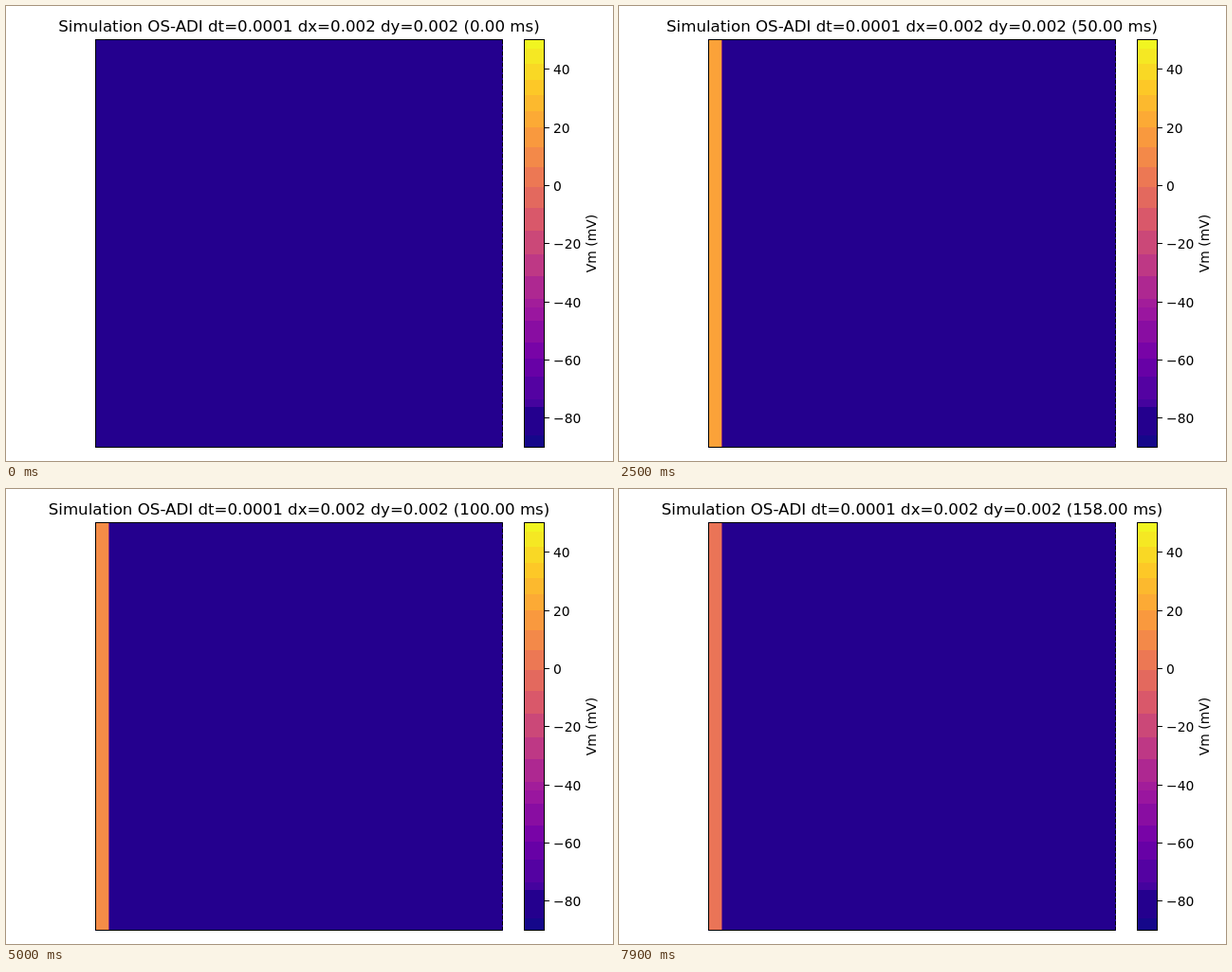
Animation of 640 by 480 pixels, one loop 8 s. Source, as an HTML page:

```html
<!DOCTYPE html>
<html lang="en">
<meta charset="utf-8">
<title>Membrane voltage simulation</title>
<style>
  html, body { margin: 0; width: 100%; height: 100%; overflow: hidden; background: #fff; }
  svg { display: block; width: 640px; height: 480px; }
  text { font: 13.889px "DejaVu Sans", sans-serif; }
  #title { font-size: 16.667px; text-anchor: middle; }
  .frame { fill: none; stroke: #000; }
</style>
<svg viewBox="0 0 640 480">
  <text id="title" x="309" y="27"></text>
  <rect x="94" y="35" width="430" height="431" fill="#24008e" shape-rendering="crispEdges"/>
  <g id="stripe">
    <rect x="95" y="36" width="13" height="429"/>
    <rect x="108" y="36" width="1" height="429" fill="#8c2c74"/>
  </g>
  <path class="frame" d="M523.5 35.5H94.5V465.5H523.5"/>
  <path class="frame" d="M523.5 36V465" stroke-dasharray="4 2"/>
  <g id="bands" shape-rendering="crispEdges"></g>
  <rect class="frame" x="546.5" y="35.5" width="21" height="430"/>
  <g id="ticks"></g>
  <text transform="translate(622 250.5) rotate(-90)" text-anchor="middle">Vm (mV)</text>
</svg>
<script>
  const $ = id => document.getElementById(id);
  const plasma = ['0d0887', '46039f', '7201a8', '9c179e', 'bd3786',
                  'd8576b', 'ed7953', 'fb9f3a', 'fdca26', 'f0f921'];

  // Colour of a voltage on the -90..50 mV scale.
  function colour(mv) {
    const u = Math.max(0, Math.min(1, (mv + 90) / 140)) * 9;
    const i = Math.min(8, Math.floor(u));
    const channel = k => {
      const [a, b] = [plasma[i], plasma[i + 1]].map(c => parseInt(c.slice(k, k + 2), 16));
      return Math.round(a + (b - a) * (u - i));
    };
    return `rgb(${[0, 2, 4].map(channel)})`;
  }

  const yOf = mv => 36 + (50 - mv) * 429.5 / 140;
  const mvOf = y => 50 - (y - 36) * 140 / 429.5;

  const edges = [36, 45, 61, 78, 94, 111, 128, 149, 170, 191, 213, 237, 262,
                 285, 309, 318, 332, 355, 372, 391, 415, 423, 453, 465];
  $('bands').innerHTML = edges.slice(1).map((end, i) => {
    const y = edges[i];
    const fill = y === 423 ? '#24008e' : colour(mvOf((y + end) / 2));
    return `<rect x="547" y="${y}" width="20" height="${end - y}" fill="${fill}"/>`;
  }).join('');

  $('ticks').innerHTML = [40, 20, 0, -20, -40, -60, -80].map(mv => {
    const y = Math.floor(yOf(mv));
    const label = String(mv).replace('-', '\u2212');
    return `<path class="frame" d="M568 ${y + .5}h5"/><text x="577" y="${y + 6}">${label}</text>`;
  }).join('');

  // Action potential of the stimulated strip: [ms, mV].
  const potential = [[2, 28], [10, 23], [30, 23], [50, 20], [80, 15], [100, 11], [130, 7], [158, 1]];
  function voltage(ms) {
    const i = Math.max(1, potential.findIndex(p => p[0] >= ms));
    const [[t0, v0], [t1, v1]] = [potential[i - 1], potential[i]];
    return v0 + (v1 - v0) * (ms - t0) / (t1 - t0);
  }

  const start = performance.now();
  function draw() {
    const ms = 2 * Math.floor((performance.now() - start) % 8000 / 100);
    const title = `Simulation OS-ADI dt=0.0001 dx=0.002 dy=0.002 (${ms.toFixed(2)} ms)`;
    if ($('title').textContent !== title) {
      $('title').textContent = title;
      $('stripe').style.display = ms ? '' : 'none';
      $('stripe').firstElementChild.setAttribute('fill', colour(voltage(ms)));
    }
    requestAnimationFrame(draw);
  }
  draw();
</script>
</html>
```
